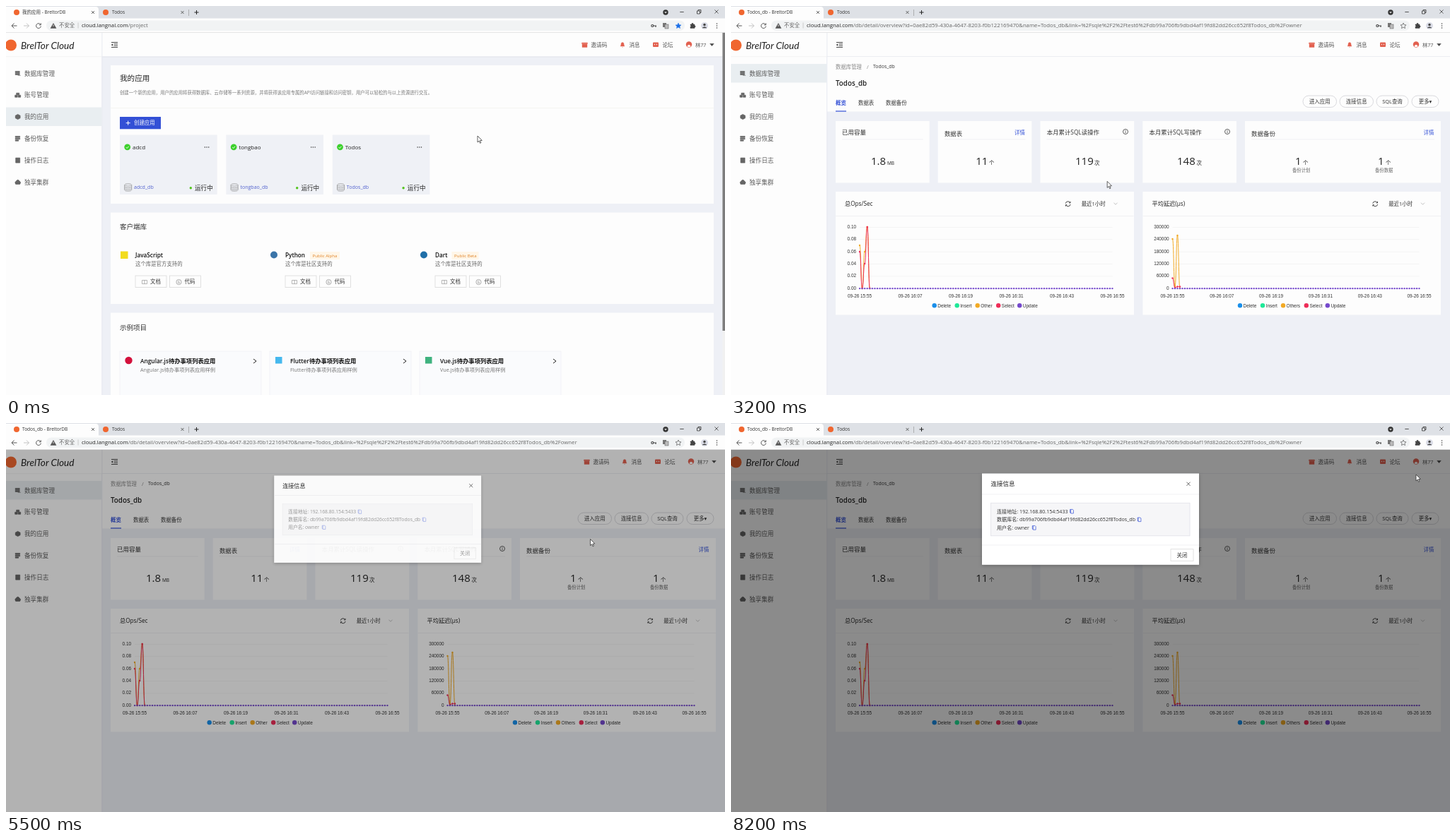
These frames come from a looping animation (1017 by 551 pixels, 8.3 s). An HTML page:

```html
<!DOCTYPE html>
<html lang="zh">
<head>
<meta charset="utf-8">
<title>Console</title>
<style>
html,body{margin:0;width:100%;height:100%;overflow:hidden;background:#eef0f6}
svg{display:block;font-family:"Open Sans","Noto Sans CJK SC","Noto Sans CJK",sans-serif}
.chart{font-family:"Liberation Sans",Arial,sans-serif}
.logo{font-family:Lato,sans-serif;font-style:italic}
text{white-space:pre}
</style>
</head>
<body>
<svg id="stage" width="1017" height="551" viewBox="0 0 1017 551"></svg>
<script>
const LOOP = 8300, WHITE = '#fdfdfd', BLUE = '#3350d6', GREY = '#666', CORAL = '#e2604f', ORANGE = '#f0662f';
const BRAND = 'BrelTor Cloud', DB_BRAND = 'BreltorDB', USER = '林77', LOGIN = 'owner';
const $ = id => document.getElementById(id);

// Drawing helpers; text takes its vertical centre.
const T = (x, c, s, z = 7.42, f = '#333', o = '') => `<text x="${x}" y="${c + z * .36}" font-size="${z}" fill="${f}" ${o}>${s}</text>`;
const R = (x, y, w, h, f, o = '') => `<rect x="${x}" y="${y}" width="${w}" height="${h}" fill="${f}" ${o}/>`;
const C = (x, y, r, f, o = '') => `<circle cx="${x}" cy="${y}" r="${r}" fill="${f}" ${o}/>`;
const P = (x, y, d, c = '#444', w = .9, f = 'none') => `<path transform="translate(${x} ${y})" d="${d}" stroke="${c}" stroke-width="${w}" fill="${f}"/>`;
const G = (id, s, o = '') => `<g id="${id}" ${o}>${s}</g>`;
const line = (x, y, w, c = '#ececef') => R(x, y, w, .7, c);
const cross = (x, y, r = 2, c = '#444') => P(x, y, `M${-r} ${-r}L${r} ${r}M${r} ${-r}L${-r} ${r}`, c, .8);
const MID = 'text-anchor="middle"', END = 'text-anchor="end"', BOLD = 'font-weight="600"';
const spin = (x, y) => `<g transform="translate(${x} ${y})"><g class="spin">` +
  [[-1, -1, .45], [1, -1, .6], [-1, 1, .8], [1, 1, 1]].map(([a, b, o]) => C(a * 2.7, b * 2.7, 2.1, '#7d92e6', `opacity="${o}"`)).join('') + '</g></g>';
const info = x => C(x, 178, 3.5, 'none', 'stroke="#333" stroke-width=".8"') + R(x - .4, 176, .8, .9, '#333') + R(x - .4, 177.5, .8, 2.4, '#333');
const reload = (x, y, c = '#333') => P(x, y, 'M-3.4 -.6A3.4 3.4 0 0 1 3 -1.6M3.4 .6A3.4 3.4 0 0 1 -3 1.6M3.3 -3.4V-1.4H1.4M-3.3 3.4V1.4H-1.4', c);
const disk = (x, y) => P(x, y, 'M-5 -3.5A5 1.7 0 0 1 5 -3.5V3.5A5 1.7 0 0 1 -5 3.5ZM-5 -3.5A5 1.7 0 0 0 5 -3.5M-5 -1A5 1.7 0 0 0 5 -1M-5 1.4A5 1.7 0 0 0 5 1.4', '#888', .7);

function browser() {
  const path = '/db/detail/overview?id=0ae82d59-430a-4647-8203-f0b122169470&amp;name=Todos_db&amp;link=%2Fsqle%2F2%2Ftest6%2Fdb99a706fb9dbd4af19fd82dd26cc652f8Todos_db%2F' + LOGIN;
  const url = p => T(107, 27.7, `cloud.langnal.com<tspan fill="#666">${p}</tspan>`, 7.74, '#222');
  const star = 'M0 -4L1.2 -1.3L4 -1.1L1.9 .8L2.5 3.6L0 2.1L-2.5 3.6L-1.9 .8L-4 -1.1L-1.2 -1.3Z';
  return R(0, 0, 1017, 18, '#dee1e6') + `<path d="M0 18V1H127Q131 1 131 6V18Z" fill="${WHITE}"/>` + R(0, 17.5, 1017, 20, WHITE) +
    C(15, 9, 4, ORANGE) + C(141, 9, 4, ORANGE) +
    G('tabHome', T(23, 9, '我的应用 - ' + DB_BRAND, 6.5)) + G('tabDb', T(23, 9, 'Todos_db - ' + DB_BRAND, 6.5)) +
    T(150, 9, 'Todos', 6.5) + cross(123, 9) + cross(249.5, 9) + R(258, 5, .7, 9, '#999') +
    P(269.5, 9, 'M-3 0H3M0 -3V3', '#222', 1) + C(933, 9, 3.7, '#333') + P(933, 9, 'M-1.5 -.6H1.5L0 1.3Z', WHITE, .3, WHITE) +
    P(956, 8.5, 'M-2.7 0H2.7') + P(980, 8, 'M-2.5 -1H1.5V3H-2.5ZM-1 -1V-2.5H3V1.5H1.5') + cross(1005, 8, 2.6) +
    P(11.5, 28, 'M4 0H-3.5M0 -3.5L-3.5 0L0 3.5') + P(29, 28, 'M-4 0H3.5M0 -3.5L3.5 0L0 3.5', '#bbb') +
    P(46, 28, 'M2.7 -2A3.4 3.4 0 1 0 3.4 .6M3.3 -3.6V-1.2H.9') +
    R(57, 20.5, 903, 14.5, '#f1f3f4', 'rx="7.2"') + P(67, 28, 'M0 -3.5L4 3.5H-4Z', '#555', .5, '#555') + R(66.6, 26.5, .8, 2.6, WHITE) +
    T(75, 27.7, '不安全', 7.42, GREY) + R(101.7, 23.5, .7, 8, '#bbb') + G('urlHome', url('/project')) + G('urlDb', url(path)) +
    C(914.3, 28, 1.5, 'none', 'stroke="#444" stroke-width="1.2"') + P(916, 28, 'M0 0H4M3 0V2', '#444', 1.1) +
    R(929, 24, 5, 6, '#777') + R(932, 26, 5, 6, '#bbb', 'stroke="#555" stroke-width=".5"') +
    G('starOn', P(951, 28, star, '#1a6fe8', .5, '#1a6fe8')) + G('starOff', P(951, 28, star, '#555', .7)) +
    P(971, 28, 'M-3 -2H-1V-3.5H1V-2H3V0H4V2H3V3.5H-3V1H-2V-.5H-3Z', '#444', .5, '#444') +
    C(988, 28, 5, '#dadce6') + C(988, 26.5, 1.7, '#444') + P(988, 31, 'M-3 0Q0 -3 3 0Z', '#444', .4, '#444') +
    [-3, 0, 3].map(d => C(1005.5, 28 + d, .8, '#444')).join('') + line(0, 37, 1017, '#ddd');
}

function frame() {
  const icons = ['M-3.5 -3H2.5V-.8H-3.5ZM-3.5 0H2.5V2H-3.5ZM0 3H4', 'M-2 -3H2V-.5H-2ZM-4 0H-.5V3H-4ZM.5 0H4V3H.5Z', 'M0 -3.6L3.4 -1.8V1.8L0 3.6L-3.4 1.8V-1.8Z',
    'M-3.5 -3.4H3V-1.6H-3.5ZM-3.5 -.6H3V1H-3.5ZM-3.5 2H1V3.4H-3.5Z', 'M-3 -3.5H3V3.5H-3Z', 'M-3 3Q-5 0 -2.5 -1.2Q0 -5 2.6 -1.2Q5 0 3 3Z'];
  const names = ['数据库管理', '账号管理', '我的应用', '备份恢复', '操作日志', '独享集群'];
  const head = P(818.5, 55, 'M-3.5 -1H3.5V3.5H-3.5ZM-4 -3H4V-1.5H-4Z', CORAL, .4, CORAL) + T(827.5, 55, '邀请码', 7.6, '#555') +
    P(872, 55, 'M-3 2Q-2 1 -2 -1Q-2 -3.5 0 -3.5Q2 -3.5 2 -1Q2 1 3 2ZM-1 3.3H1', CORAL, .4, CORAL) + T(881.5, 55, '消息', 7.6, '#555') +
    R(915, 51.5, 8, 6.6, CORAL, 'rx="1"') + C(917.5, 54.5, .7, WHITE) + C(920.5, 54.5, .7, WHITE) + T(928.5, 55, '论坛', 7.6, '#555') +
    C(966, 54.5, 4.2, CORAL) + P(966, 58, 'M-2 0V-2Q0 -4 2 -2V0Z', WHITE, .2, WHITE) + T(975, 55, USER, 7.2, '#555') + P(998.5, 54.7, 'M-3 -1.5H3L0 2Z', '#444', .2, '#444');
  return R(0, 37.5, 1017, 34, WHITE) + R(0, 71.5, 1017, 1, '#e3e6ec') + R(0, 37.5, 135.5, 514, WHITE) + R(135.5, 37.5, .8, 514, '#e4e6ee') +
    R(0, 71.5, 135, .7, '#eee') + C(7, 55.5, 8, ORANGE) + T(21, 56, BRAND, 13.6, '#222', 'class="logo"') +
    P(153.5, 55, 'M-4.5 -3.5H4.5M-1 -1.2H4.5M-1 1.2H4.5M-4.5 3.5H4.5', '#333') + P(151, 55, 'M0 -1.5V1.5L-2 0Z', '#333', .2, '#333') +
    G('head', head) + G('band', R(0, 0, 135.5, 26.5, '#e9eef1')) +
    names.map((n, i) => P(16.7, 95.4 + i * 30.8, icons[i], '#555', .6, '#666') + T(26, 95.6 + i * 30.8, n, 8.6, '#5c5c5c')).join('');
}

function home() {
  const apps = ['adcd', 'tongbao', 'Todos'].map((n, i) => {
    const x = 161 + i * 150.4;
    return (i == 2 ? G('lift', R(x, 182.5, 138, 85, '#f3f4f8', 'filter="url(#shade)"')) : '') + R(x, 182.5, 137.6, 84.5, '#eff1f6') +
      C(x + 10.7, 199.8, 4.4, '#3cd02c') + P(x + 10.7, 200, 'M-2 0L-.5 1.5L2 -1.3', WHITE) + T(x + 18, 200.3, n, 8, '#222', 'font-weight="500"') +
      [-2.7, 0, 2.7].map(d => C(x + 123 + d, 200, .75, '#333')).join('') + disk(x + 11.7, 257) + T(x + 20, 256.5, n + '_db', 7.05, '#5363cf') +
      C(x + 100.3, 257.8, 1.7, '#52c41a') + T(x + 106, 257.5, '运行中', 8.6, '#222');
  }).join('');
  const button = (x, s) => R(x, 382, 44, 16.5, WHITE, 'stroke="#d9d9d9" stroke-width=".8"') + T(x + 21, 390.5, s);
  const libs = [['JavaScript', '官方', '', '#f2dc1e'], ['Python', '社区', 'Public Alpha', '#3a74a8'], ['Dart', '社区', 'Public Beta', '#1f6fa8']].map(([n, who, tag, c], i) => {
    const x = 161 + i * 212, tx = x + (i == 1 ? 60.5 : 49), w = i == 1 ? 37 : 33;
    return (i ? C(x + 6, 352.5, 5, c) : R(x + 1, 347.5, 10.5, 10.5, c)) + T(x + 22, 353.5, n, 8.2, '#111', BOLD) +
      (i ? R(tx - 3.5, 348, w + 5, 11, '#fff6e8') + T(tx, 353.5, tag, 6.1, '#e08428') : '') +
      T(x + 22, 365.5, `这个库是${who}支持的`, 7.42, GREY) + button(x + 22, '文档') + button(x + 70.5, '代码') +
      P(x + 35, 391, 'M-3.5 -2.5H3.5V2.5H-3.5ZM0 -2.5V2.5', '#888', .6) + C(x + 83.5, 391, 3.6, 'none', 'stroke="#888" stroke-width=".7"') + T(x + 83.5, 391, 'G', 4.5, GREY, MID);
  }).join('');
  const demos = [['Angular.js', '#d3103c'], ['Flutter', '#45b8ee'], ['Vue.js', '#3fb27f']].map(([n, c], i) => {
    const x = 161 + i * 212;
    return R(x, 489, 200, 80, '#fafbfd', 'stroke="#f0f1f5" stroke-width=".8"') + (i ? R(x + 8, 497, 9.5, 9.5, c) : C(x + 12.5, 502, 5.2, c)) +
      T(x + 29, 503, n + '待办事项列表应用', 8.3, '#111', BOLD) + T(x + 29, 515, n + '待办事项列表应用样例', 7.25, '#777') + P(x + 191, 503, 'M-2 -3L2 0L-2 3', '#222', 1);
  }).join('');
  return R(148, 84, 853, 196, WHITE) + R(148, 292.5, 853, 129.5, WHITE) + R(148, 434.5, 853, 120, WHITE) +
    T(161, 101.7, '我的应用', 10.6, '#222') +
    T(161, 122.7, '创建一个新的应用，用户的应用将获得数据库、云存储等一系列资源，并将获得该应用专属的API访问链接和访问密钥，用户可以轻松的与以上资源进行交互。', 6.36, '#777') +
    line(148, 144, 853, '#f2f2ee') + R(161, 157, 58, 17.3, BLUE) + P(172.7, 165.7, 'M-3 0H3M0 -3V3', '#fff', 1) + T(181, 165.7, '创建应用', 7.42, '#fff') +
    apps + T(161, 313, '客户端库', 9.54) + libs + T(161, 455.5, '示例项目', 9.54) + demos + R(1013.5, 37.5, 3.5, 514, '#f1f1f1') + R(1013.5, 37.5, 3.5, 422.5, '#7d7d7d');
}

const KEYS = ['Delete', 'Insert', 'Other', 'Select', 'Update'], INKS = ['#1a8fea', '#1fe898', '#f2aa25', '#ee2d58', '#7549cc'];
const legend = (x, many) => KEYS.map((k, i) => {
  const d = x + [0, 32, 61, 90.5, 120.5][i] + (many && i > 2 ? 3.3 : 0);
  return C(d, 424.3, 3.2, INKS[i]) + T(d + 4.6, 424.3, many && i == 2 ? 'Others' : k, 6.5);
}).join('');

function chart(x0, x1, ticks, series, legendX, many) {
  const step = (x1 - x0) / 100;
  const curve = (ys, c) => P(x0, 0, ys.map((y, i) => i ? `C${(i - .5) * step} ${ys[i - 1]} ${(i - .5) * step} ${y} ${i * step} ${y}` : `M0 ${y}`).join(''), c, 1) +
    ys.map((y, i) => C(x0 + i * step, y, 1.2, c)).join('');
  return ticks.map((s, i) => T(x0 - 5, 312.5 + i * 17.4, s, 6.4, '#333', END) + (i < 5 ? line(x0, 313 + i * 17.4, x1 - x0, '#f1f1f1') : '')).join('') +
    ['15:55', '16:07', '16:19', '16:31', '16:43', '16:55'].map((s, i) => T(x0 + i * (x1 - x0) / 5, 411, '09-26 ' + s, 6.4, '#333', MID)).join('') +
    curve(series[0], INKS[2]) + curve(series[1], INKS[3]) + `<path d="M${x0} 400.2H${x1}" stroke="#b9a6e6" stroke-width=".7"/>` +
    `<path d="M${x0} 400.2H${x1 + .1}" stroke="${INKS[4]}" stroke-width="2.3" stroke-linecap="round" stroke-dasharray="0 ${step}"/>` + legend(legendX, many);
}

const pill = (x, w, s, c = '#333', b = '#d5d5da') => R(x, 127, w, 16.5, WHITE, `rx="8.2" stroke="${b}" stroke-width=".9"`) + T(x + w / 2, 135.3, s, 7.42, c, MID);

function database() {
  const stats = [[148, '已用容量', 198, '1.8', 221, 'MB', 205], [292.7, '数据表', 346.3, '11', 365, '个', 350], [437.5, '本月累计SQL读操作', 487, '119', 514, '次', 495], [582.3, '本月累计SQL写操作', 631, '148', 658.5, '次', 640]];
  const value = (x, s, ux, u, f = '#222') => T(x, 219.5, s, 15, f) + T(ux, 222.5, u, u == 'MB' || u == 'KB' ? 6.5 : 7.42, f);
  const backup = (n, f) => [['备份计划', 0], ['备份数据', 117]].map(([s, d]) => value(798 + d, n, 809 + d, '个', f) + T(794 + d, 232.3, s, 6.36, f == '#222' ? GREY : f)).join('');
  const pale = '#aaa';
  const rows = [[590, 962], [590, 723, 727, 979], [590, 689, 693, 996], [590, 808, 812, 962], [590, 654, 658, 706, 710, 979], [590, 723, 727, 825, 829, 962]];
  const panel = (x, s) => T(x + 13, 280.5, s, 8.2, '#222', 'font-weight="500"') + line(x, 297, 421.5) + reload(x + 328.7, 280.3) + T(x + 347.7, 280.5, '最近1小时') + P(x + 396, 280, 'M-2.5 -1.3L0 1.3L2.5 -1.3', '#aaa', .7);
  return R(136.3, 72, 881, 77.5, WHITE) + T(148, 86, '数据库管理', 7.42, '#888') + T(192, 86, '/', 7.42, '#888') + T(201, 86, 'Todos_db', 6.9) +
    T(148, 109.3, 'Todos_db', 9.8, '#222', BOLD) + T(148, 137.3, '概览', 7.42, BLUE, BOLD) + T(180, 137.3, '数据表') + T(219, 137.3, '数据备份') + R(148, 148.4, 15, 1.2, BLUE) +
    pill(861, 47.5, '连接信息') + G('hot', pill(861, 47.5, '连接信息', '#4a60d4', '#5a70de')) + pill(913, 45, 'SQL查询') + pill(963, 38, '更多▾') +
    stats.map(([x, s]) => R(x, 163, 132.7, 87.5, WHITE) + line(x + 9, 188.6, 114.7) + (x > 148 ? T(x + 9.3, x < 300 ? 180.5 : 178.5, s, 8.4) : '')).join('') +
    R(727, 163, 277, 87.5, WHITE) + line(736, 188.6, 259) + T(736, 180.5, '数据备份', 8.48) +
    T(401, 179.8, '详情', 7.42, BLUE) + T(979.5, 179.8, '详情', 7.42, BLUE) + info(558) + info(702) +
    R(148, 263, 422, 174.5, WHITE) +
    G('waiting', R(148, 163, 132.7, 87.5, '#f7f8fa') + T(157, 178.5, '已用容量', 8.48, '#bbb') +
      stats.map(([x, , , , , u, zx]) => value(zx, '0', zx + 11, u == 'MB' ? 'KB' : u, pale)).join('') + backup('0', pale) +
      spin(214.5, 211) + spin(359, 219.3) + spin(503.7, 219.3) + spin(648.3, 219.3) + spin(865.5, 219.3)) +
    G('values', T(157, 178.5, '已用容量', 8.48) + stats.map(([, , a, s, b, u]) => value(a, s, b, u)).join('') + backup('1', '#222') + pill(809, 47.5, '进入应用')) +
    G('empty', R(582.5, 263, 421.5, 103.5, WHITE) +
      rows.map((r, i) => r.map((x, j) => j % 2 ? '' : R(x, 299.6 + i * 11.6, r[j + 1] - x, 7, '#eff0f3')).join('')).join('') +
      `<g class="chart">${['0.10', '0.08', '0.06', '0.04', '0.02', '0.00'].map((s, i) => T(165.5, 312.5 + i * 21.6, s, 6.4, '#333', END)).join('')}${R(150, 305, 5.8, 122, WHITE)}${legend(287.7)}</g>`) +
    G('charts', R(582.5, 263, 421.5, 174.5, WHITE) +
      chart(182, 539.5, ['0.10', '0.08', '0.06', '0.04', '0.02', '0.00'], [[339, 400, 348, 313, 400], [348, 400, 365, 313, 400]], 287.7) +
      chart(624.5, 973.5, ['300000', '240000', '180000', '120000', '60000', '0'], [[330, 398, 325, 400], [385.5, 399, 397.5, 397.5]], 720, true), 'class="chart"') +
    panel(148, '总Ops/Sec') + panel(582.5, '平均延迟(μs)');
}

function dialog() {
  const copy = (x, y) => P(x, y, 'M-2.4 -2.8H1.4L2.4 -1.8V2.8H-1.4V-2.8M-2.4 -2.8V1.8H-1.4', '#4a63da', .8);
  const lines = [['连接地址: ', '192.168.80.154:5433', 482, 412], ['数据库名: ', 'db99a706fb9dbd4af19fd82dd26cc652f8Todos_db', 577.5, 412], ['用户名: ', LOGIN, 428.7, 404]];
  const rows = full => lines.map(([k, v, far, near], i) => T(376, 125.2 + i * 11.6, k + (full ? v : ''), 7.1, '#333') + copy(full ? far : near, 125.2 + i * 11.6)).join('');
  return R(355, 71.5, 307, 129.3, '#fff', 'filter="url(#shade)"') + T(367.5, 86.3, '连接信息', 8.48, '#222') + cross(647, 86.3, 2.6) + line(355, 100.6, 307) +
    G('body', G('labels', rows(false)) + G('details', R(367.5, 113.3, 281.5, 46.5, '#f6f6f8', 'stroke="#e2e2e8" stroke-width=".8"') + rows(true)) +
      R(622, 178.7, 32, 16.6, '#fff', 'stroke="#d9d9d9" stroke-width=".8"') + T(638, 187, '关闭', 7.42, '#333', MID)) +
    line(355, 172.6, 307) + G('modalSpin', spin(507, 150), 'opacity=".7"');
}

$('stage').innerHTML = '<filter id="shade" x="-20%" y="-20%" width="140%" height="140%"><feDropShadow dx="0" dy="1.5" stdDeviation="2.5" flood-opacity=".25"/></filter>' +
  frame() + G('home', home()) + G('db', database()) + G('mask', R(0, 37.5, 1017, 514, '#000')) + G('modal', dialog()) + browser() +
  G('pointer', G('arrow', P(0, 0, 'M0 0V9L2.1 7.1L3.5 10.3L4.9 9.7L3.5 6.6L6.3 6.4Z', '#222', .7, '#fff')) +
    G('hand', P(0, 0, 'M-1 1Q0 -1 1 1V4.2L5 5.2Q6.2 5.7 5.9 7.5L5 12H.2L-3.2 7.8Q-2.6 6.2 -1 7.6Z', '#222', .8, '#fff')));

// Pointer stops: time, x, y.
const STOPS = [[0, 667, 184], [200, 667, 184], [1300, 502, 259], [2200, 502, 259], [2400, 498, 259], [3000, 498, 259], [4100, 890, 137], [5200, 890, 137], [5400, 887, 136], [5600, 766, 193], [6000, 705, 205], [7000, 705, 205], [8000, 969, 73], [LOOP, 969, 73]];
const clamp = v => Math.max(0, Math.min(1, v));
function pointerAt(t) {
  const i = STOPS.findIndex(s => s[0] > t), [t0, x0, y0] = STOPS[i - 1], [t1, x1, y1] = STOPS[i];
  let u = (t - t0) / (t1 - t0);
  u = u * u * (3 - 2 * u);
  return [x0 + (x1 - x0) * u, y0 + (y1 - y0) * u];
}
// cubic-bezier(.08, .82, .17, 1)
function easeOutCirc(t) {
  const bez = (a, b, s) => 3 * a * s * (1 - s) ** 2 + 3 * b * s * s * (1 - s) + s ** 3;
  let lo = 0, hi = 1;
  for (let i = 0; i < 24; i++) {
    const m = (lo + hi) / 2;
    if (bez(.08, .17, m) < t) lo = m; else hi = m;
  }
  return bez(.82, 1, hi);
}
const show = (id, on) => $(id).style.display = on ? '' : 'none';
const OPEN = 5367;

function draw(t) {
  const onDb = t >= 2200, moved = t >= 1900, loaded = t >= 2900, plotted = t >= 3100, open = t >= OPEN, filled = t >= 5500;
  const [x, y] = pointerAt(t);
  const hover = !onDb && x > 462 && x < 599 && y > 182 && y < 267, hot = onDb && t < 5500 && x > 861 && x < 908 && y > 127 && y < 144;
  const hand = (hover && x < 514 && y > 250) || (hot && !open);
  Object.entries({
    home: !onDb, db: onDb, tabHome: !onDb, tabDb: onDb, urlHome: !moved, urlDb: moved, starOn: !moved, starOff: moved, lift: hover, hot,
    waiting: !loaded, values: loaded, empty: !plotted, charts: plotted, mask: open, modal: open, labels: !filled, details: filled, modalSpin: !filled, hand, arrow: !hand
  }).forEach(([id, on]) => show(id, on));
  $('head').setAttribute('transform', `translate(${onDb ? 3 : 0} 0)`);
  $('band').setAttribute('transform', `translate(0 ${onDb ? 82 : 143.5})`);
  $('pointer').setAttribute('transform', `translate(${x} ${y})`);
  document.querySelectorAll('.spin').forEach(s => s.setAttribute('transform', `rotate(${(t - 2500) * .3})`));
  const p = easeOutCirc(clamp((t - OPEN) / 300));
  $('mask').setAttribute('opacity', .45 * clamp((t - OPEN) / 200));
  $('modal').setAttribute('transform', `translate(880 137) scale(${.2 + .8 * p}) translate(-880 -137)`);
  $('modal').setAttribute('opacity', p);
  $('body').setAttribute('opacity', .5 + .5 * clamp((t - 5550) / 300));
}
function tick() {
  draw(Math.floor(performance.now() % LOOP / 100) * 100);
  requestAnimationFrame(tick);
}
tick();
</script>
</body>
</html>
```
